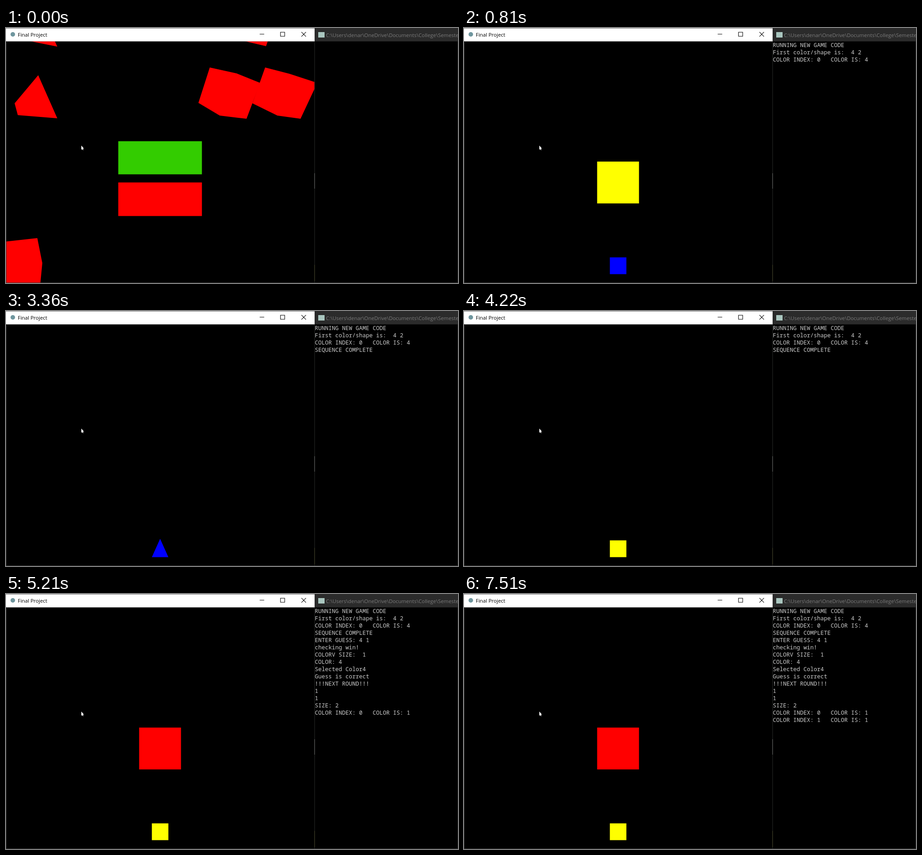
Animation of 996x562 px, one loop 8 s. Source, as an HTML page:

```html
<!DOCTYPE html>
<html lang="en">
<head>
<meta charset="utf-8">
<title>Final Project</title>
<style>
  html, body { margin: 0; width: 100%; height: 100%; overflow: hidden; background: #000; }
  svg { display: block; width: 996px; height: 562px; }
  text { white-space: pre; }
  .ui { font: 11.4px "Open Sans", "Noto Sans", sans-serif; }
  #log { font: 12.5px "Noto Sans Mono", "DejaVu Sans Mono", monospace; fill: #ccc; }
</style>
</head>
<body>
<svg viewBox="0 0 996 562">
  <defs><clipPath id="view"><rect x="1" y="29.5" width="679" height="531.5"/></clipPath></defs>
  <rect width="996" height="562"/>

  <g id="menu" clip-path="url(#view)">
    <g id="rocks" fill="#f00"></g>
    <rect x="247.4" y="249.5" width="184.3" height="73" fill="#3c0"/>
    <rect x="247.4" y="340.4" width="184.3" height="74" fill="#f00"/>
  </g>
  <g id="game">
    <rect id="big" x="293.4" y="294.4" width="92.2" height="92.2"/>
    <path id="pick"/>
  </g>

  <rect width="680" height="29.5" fill="#fff"/>
  <rect width="680" height="1" fill="#777"/>
  <rect y="29" width="1" height="533" fill="#3a3a3a"/>
  <rect y="561" width="996" height="1" fill="#3c3c3c"/>
  <rect x="680" width="316" height="29.5" fill="#2b2b2b"/>
  <rect x="995" y="29" width="1" height="533" fill="#2b2b2b"/>
  <rect x="679.5" y="30" width="1" height="531" fill="#2a2c2a"/>
  <rect x="679.5" y="320" width="1" height="34" fill="#666"/>
  <rect x="679.5" y="522" width="1" height="36" fill="#3c3d20"/>

  <circle cx="15" cy="14" r="5" fill="#6f969e"/>
  <text class="ui" x="26" y="19">Final Project</text>
  <g fill="none" stroke="#000" stroke-width="1.1">
    <path d="M559 13.5h10M604.9 9.2h9.2v9h-9.2z"/>
    <path d="M651 8.8l10 10M661 8.8l-10 10"/>
  </g>
  <rect x="688" y="9" width="14" height="12" fill="#a9c6bf"/>
  <text class="ui" x="705" y="20" fill="#7b7b7b">C:\Users\denar\OneDrive\Documents\College\Semeste</text>

  <g id="log"></g>
  <path d="M166 259v9.5l2-1.8 1.2 2.6 1.4-.7-1.2-2.6 2.3-.3z" fill="#fff"/>
</svg>
<script>
const LOOP = 8000;
const $ = id => document.getElementById(id);

function add(parent, tag, attrs) {
  const el = document.createElementNS("http://www.w3.org/2000/svg", tag);
  for (const k in attrs) el.setAttribute(k, attrs[k]);
  return parent.appendChild(el);
}

// Each rock: pivot and outline
const rocks = [
  [75, 12, "48,28 113,41 100,12 60,0"],
  [556, 12, "526,29 573,40 583,12 540,0"],
  [60, 160, "71,104 113,199 26,192 19,166"],
  [493, 143, "449,87 508,100 560,121 530,200 471,193 424,165"],
  [615, 143, "571,87 625,101 686,121 649,200 598,193 543,166"],
  [18, 515, "-4,471 69,463 80,518 75,570 -4,570"]
].map(([x, y, points]) => ({ x, y, el: add($("rocks"), "polygon", { points }) }));

const lines = [
  "RUNNING NEW GAME CODE",
  "First color/shape is:  4 2",
  "COLOR INDEX: 0   COLOR IS: 4",
  "SEQUENCE COMPLETE",
  "ENTER GUESS: 4 1",
  "checking win!",
  "COLORV SIZE:  1",
  "COLOR: 4",
  "Selected Color4",
  "Guess is correct",
  "!!!NEXT ROUND!!!",
  "1",
  "1",
  "SIZE: 2",
  "COLOR INDEX: 0   COLOR IS: 1",
  "COLOR INDEX: 1   COLOR IS: 1"
];
const rows = lines.map((s, i) => add($("log"), "text", { x: 680.4, y: 42 + 16 * i }));

const square = "M321.4 505.4h36.4v37.2h-36.4z";
const triangle = "M339.6 502L357.8 542.6H321.4z";
const red = "#f00", yellow = "#ff0", blue = "#00f";

// Every step changes only the listed values
const steps = [
  { at: 0, menu: true, turn: 0, big: "none", pick: blue, shape: square, rows: 0, partial: 0 },
  { at: 150, turn: 2 },
  { at: 550, turn: 4 },
  { at: 810, menu: false, big: yellow, rows: 3 },
  { at: 2870, big: "none" },
  { at: 3200, rows: 4 },
  { at: 3360, shape: triangle },
  { at: 3790, shape: square },
  { at: 4220, pick: yellow },
  { at: 5070, rows: 14 },
  { at: 5210, big: red, rows: 15 },
  { at: 7230, big: "none" },
  { at: 7360, partial: 1 },
  { at: 7510, big: red, rows: 16, partial: 0 }
];

function draw(t) {
  const s = Object.assign({}, ...steps.filter(step => step.at <= t));
  $("menu").style.display = s.menu ? "" : "none";
  $("game").style.display = s.menu ? "none" : "";
  for (const r of rocks) r.el.setAttribute("transform", `rotate(${s.turn} ${r.x} ${r.y})`);
  $("big").setAttribute("fill", s.big);
  $("pick").setAttribute("fill", s.pick);
  $("pick").setAttribute("d", s.shape);
  rows.forEach((row, i) => {
    const shown = i < s.rows ? lines[i] : i === s.rows ? lines[i].slice(0, s.partial) : "";
    if (row.textContent !== shown) row.textContent = shown;
  });
}

const start = performance.now();
function tick() {
  draw((performance.now() - start) % LOOP);
  requestAnimationFrame(tick);
}
tick();
</script>
</body>
</html>
```
